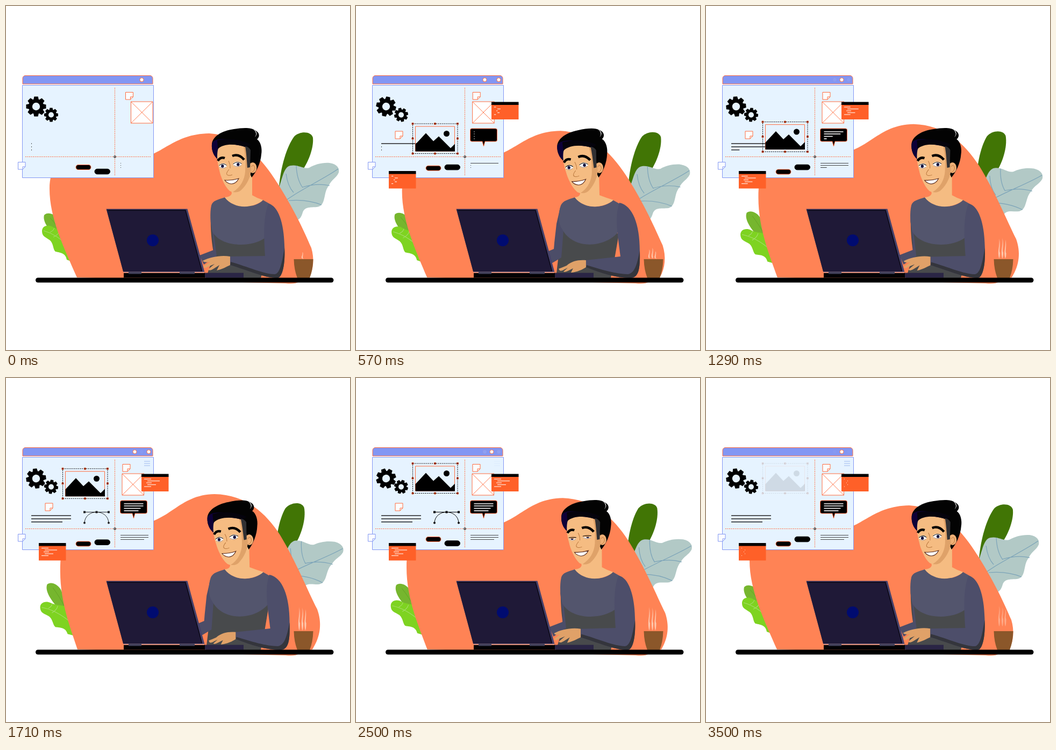
An HTML page with a canvas for the animation above (3570 ms loop, 640 by 640 pixels).

```html
<!DOCTYPE html>
<html lang="en">
<head>
<meta charset="utf-8">
<title>Designer at work</title>
<style>
html, body { margin: 0; width: 100%; height: 100%; overflow: hidden; background: #fff; }
canvas { display: block; }
</style>
</head>
<body>
<canvas id="stage" width="640" height="640"></canvas>
<script>
const ctx = document.getElementById('stage').getContext('2d');
const LOOP = 3570;
const TAU = Math.PI * 2;
const ORANGE = '#ff6b3d', BLUE = '#8296f3', PANEL = '#e6f3ff', INK = '#000';

const ramp = (t, a, b) => Math.min(1, Math.max(0, (t - a) / (b - a)));
const ease = (t, a, b) => {
  const k = ramp(t, a, b);
  return k * k * (3 - 2 * k);
};
const wave = (t, period) => (1 - Math.cos(TAU * t / period)) / 2;

// Blends two path strings that share the same commands.
function morph(a, b, k) {
  const to = b.match(/-?[\d.]+/g);
  let i = 0;
  return a.replace(/-?[\d.]+/g, n => +n + (to[i++] - n) * k);
}

function fill(path, color) {
  ctx.fillStyle = color;
  ctx.fill(new Path2D(path));
}

function stroke(path, color, width = 1) {
  ctx.strokeStyle = color;
  ctx.lineWidth = width;
  ctx.stroke(new Path2D(path));
}

function oval(x, y, rx, ry, color, line) {
  ctx.beginPath();
  ctx.ellipse(x, y, rx, ry, 0, 0, TAU);
  ctx.fillStyle = color;
  ctx.fill();
  if (line) { ctx.strokeStyle = line; ctx.lineWidth = 1; ctx.stroke(); }
}

function box(x, y, w, h, color, line, r = 0) {
  ctx.beginPath();
  ctx.roundRect(x, y, w, h, r);
  if (color) { ctx.fillStyle = color; ctx.fill(); }
  if (line) { ctx.strokeStyle = line; ctx.lineWidth = 1; ctx.stroke(); }
}

function group(draw, { alpha = 1, x = 0, y = 0, scale = 1, turn = 0 } = {}) {
  if (alpha <= 0 || scale <= 0) return;
  ctx.save();
  ctx.globalAlpha *= alpha;
  ctx.translate(x, y);
  ctx.rotate(turn);
  ctx.scale(scale, scale);
  draw();
  ctx.restore();
}

// Turns a drawing around a point of the stage.
function pivot(x, y, degrees, draw) {
  group(() => { ctx.translate(-x, -y); draw(); }, { x, y, turn: degrees * Math.PI / 180 });
}

function dashed(path, color, dash) {
  ctx.setLineDash(dash);
  stroke(path, color);
  ctx.setLineDash([]);
}

function leaves(k) {
  pivot(525, 400, -6 * k, () =>
    fill('M508 336 C511 300 522 262 536 243 C547 232 568 233 571 245 C573 265 561 297 542 318 L510 350Z', '#417505'));
  pivot(478, 397, 5.7 * k, () => {
    fill('M505 345 C514 325 515 300 529 297 C544 294 553 304 564 301 C574 295 588 291 602 292 C616 294 621 302 619 310 C614 321 606 322 600 335 C594 343 594 351 592 358 C590 368 586 373 578 374 C566 375 556 373 552 384 Q548 399 539 398 L500 390Z', '#b2c9c6');
    stroke('M505 374 C535 347 585 326 618 303 M540 297 Q541 323 552 338 M521 312 Q524 335 535 347 M552 337 Q578 329 602 334 M526 362 Q560 359 587 370', '#7ba3b8', 1.2);
  });
  pivot(130, 450, 5 * k, () => {
    fill('M71 389 C76 383 89 385 97 396 C104 408 108 422 120 440 L105 440 C84 422 67 403 71 389Z', '#76b62e');
    stroke('M82 394 Q95 408 110 432', '#5f9a22', .7);
  });
  pivot(157, 458, -5.7 * k, () => {
    fill('M67 419 C67 408 79 406 87 411 C98 418 108 416 125 425 L135 480 L113 472 C111 460 102 459 92 457 C87 453 89 443 82 436 C74 430 67 429 67 419Z', '#7ed321');
    stroke('M70 418 Q95 425 120 450 M82 421 Q89 418 90 413 M88 430 Q98 425 100 418', '#a9dc70', 1);
  });
}

function backdrop(k) {
  fill(morph(
    'M132 505 C108 450 81 395 81 340 C81 300 100 285 130 285 L240 285 C290 280 310 238 378 237 C430 240 470 275 500 322 C535 375 555 420 568 450 C574 470 572 490 564 505 L545 513 Q538 518 520 516 L440 514Z',
    'M133 505 C122 470 101 420 101 360 C101 310 110 285 140 274 L240 273 C305 270 320 217 388 216 C447 217 484 252 510 292 C540 342 561 395 579 430 C588 455 586 480 570 505 L545 513 Q538 518 520 516 L440 514Z',
    k), '#ff8355');
}

function gear(x, y, size, turn) {
  group(() => {
    ctx.fillStyle = INK;
    for (let i = 0; i < 8; i++) {
      ctx.rotate(TAU / 8);
      ctx.beginPath();
      ctx.moveTo(-5, -12);
      ctx.lineTo(-3.6, -18.5);
      ctx.lineTo(3.6, -18.5);
      ctx.lineTo(5, -12);
      ctx.fill();
    }
    oval(0, 0, 14, 14, INK);
    oval(0, 0, 7.2, 7.2, PANEL);
  }, { x, y, scale: size, turn });
}

function note(x, y, w, h, line) {
  const r = x + w, b = y + h;
  const path = `M${x} ${y} H${r} V${b - 5} L${r - 5} ${b} H${x}Z`;
  fill(path, '#fbfdff');
  stroke(path + ` M${r} ${b - 5} H${r - 5} V${b}`, line);
}

// Each row is x, y, length.
function rows(list, color, width, part) {
  list.forEach(([x, y, len], i) => stroke(`M${x} ${y} h${Math.max(1, len * part(i))}`, color, width));
}

function card(x, y, t) {
  const len = ramp(t, 290, 1400) * (1 - ramp(t, 2700, 3450));
  group(() => {
    box(0, -28, 50.5, 28, '#ff6028');
    box(0, -32.5, 50.5, 5.5, INK);
    rows([[5, -23, 13], [11, -19.5, 23], [9, -16, 10], [11, -12.5, 16], [5, -9, 13]], '#ffe9df', 1.2, () => len);
  }, { x, y, scale: ease(t, 0, 360) });
}

function picture(t) {
  group(() => {
    dashed('M.5 .5 H84 V56 H.5Z', INK, [2, 1.6]);
    box(5.5, 5.5, 73, 46, null, ORANGE);
    fill('M5.5 52 V39 L25 18 L39 33 L49 24 L71 46 L79 38 V52Z', INK);
    oval(63.5, 19, 5.5, 5.5, INK);
    for (const x of [.5, 42, 84])
      for (const y of [.5, 28, 56])
        if (x !== 42 || y !== 28) box(x - 1.5, y - 1.5, 3, 3, '#5a1500', '#d04a20');
  }, { x: 105, y: 218.5 - 60 * ease(t, 1190, 1890), alpha: ramp(t, 120, 430) * (1 - ramp(t, 3150, 3540)) });
}

function curveTool(t) {
  group(() => {
    stroke('M146 249.5 H191 M146 269 C148 243 189 243 191 269', INK);
    for (const x of [146, 168.5, 191]) box(x - 2, 247.5, 4, 4, INK);
    oval(146, 269.5, 2, 2, INK);
    oval(191, 269.5, 2, 2, INK);
  }, { alpha: ramp(t, 1300, 1800) * (1 - ramp(t, 2980, 3450)) });
}

function bubble(t) {
  const s = ease(t, 0, 550);
  group(() => {
    const path = 'M-22 -34 H22 Q25 -34 25 -31 V-13 Q25 -10 22 -10 H2.5 L0 -1 L-2.5 -10 H-22 Q-25 -10 -25 -13 V-31 Q-25 -34 -22 -34Z';
    fill(path, INK);
    stroke(path, ORANGE);
    if (t > 550)
      rows([[-18, -28, 36], [-18, -24, 36], [-18, -19.5, 31], [-18, -15, 27]], '#fff', 1.6,
        i => ramp(t, 720 + 160 * i, 1200 + 160 * i));
  }, { x: 237.5, y: 262, scale: s, alpha: s ** 3 });
}

function pills(t) {
  const c = t % 2380;
  const left = 300 + 8.5 * (ease(c, 400, 1000) - ease(c, 1850, 2350));
  const right = 308 - 8 * (ease(c, 50, 600) - ease(c, 1400, 1880));
  box(130, left - 4.5, 28, 9, INK, ORANGE, 4.5);
  box(165, right - 4.8, 28.5, 9.6, INK, INK, 4.8);
}

function board(t) {
  const beat = wave(t, 1190);
  box(31, 129.5, 242, 15.5, BLUE, ORANGE, [5, 5, 0, 0]);
  [239, 252, 265].forEach((x, i) =>
    group(() => oval(x + .5, 137.3, 3.6, 3.6, '#fff', ORANGE), { alpha: i === 1 ? 1 - beat : beat }));
  box(30.5, 147.5, 244, 172, PANEL, BLUE);

  dashed('M202.5 152 V315 M36 280.5 H270', ORANGE, [2, 1.5]);
  box(201, 279, 3, 3, '#fff', INK);

  const spin = TAU * t / LOOP;
  gear(56, 187, 1, spin);
  gear(84, 202.5, .7, -spin);

  const menu = ramp(t, 1400, 1650) * (1 - .85 * ramp(t, 2250, 2500)) - .1 * ramp(t, 2500, 2900) + .95 * ramp(t, 3120, 3420);
  group(() => stroke('M257 155 h11 M257 159 h11 M257 163 h11', '#9fb9ee'), { alpha: Math.min(1, menu) });

  const part = i => ramp(t, 570 * i, 570 * (i + 1));
  rows([[47, 256, 74], [47, 262, 74], [47, 267.7, 58]], '#222', 1.4, part);
  rows([[213, 292.5, 52], [213, 296.5, 52], [213, 300.5, 44]], '#444', 1.1, part);

  const slide = ease(t, 0, 650);
  note(222.5 - 5.5 * slide, 160.5, 14, 13.5, ORANGE);
  const x = 232.5 - 16.5 * slide;
  box(x, 178, 40.5, 40, '#fff', ORANGE);
  stroke(`M${x} 178 l40.5 40 M${x + 40.5} 178 l-40.5 40`, ORANGE, .9);

  const pop = ease(t, 0, 560) * (1 - ease(t, 2960, 3450));
  group(() => note(-14, -14, 14, 14, ORANGE), { x: 87, y: 247, scale: pop, alpha: Math.min(1, 1.2 * pop) });

  picture(t);
  curveTool(t);
  bubble(t);
  pills(t);
  note(22.5, 290.5, 13.5, 13.5, BLUE);
  card(252, 211, t);
  card(61, 339.5, t);
}

function cup(t) {
  const lift = ramp(t, 2500, 3570);
  [[545.5, 180], [551.5, -500], [557, 400]].forEach(([x, start], i) => {
    if (t < start) return;
    const h = 12 + 32 * ease(t, Math.max(start, 0), 1750);
    const b = 470 - 8 * lift, m = b - h / 2, top = Math.max(b - h, 424 + 3 * i);
    group(() => fill(`M${x} ${b} C${x - 4} ${m + 4} ${x + 1} ${m} ${x} ${top} C${x + 3} ${m - 5} ${x - 1} ${m + 4} ${x + 1.5} ${m + 8} Q${x + 1.5} ${b - 4} ${x} ${b}Z`, '#ffd0b8'),
      { alpha: .9 - .4 * lift });
  });
  fill('M535.5 471 H571.5 Q571 491 565 506 H542 Q536 491 535.5 471Z', '#8b572a');
}

function eye(x, y, rx, px, shut) {
  ctx.save();
  ctx.beginPath();
  ctx.ellipse(x, y, rx, 4.9, -.05, 0, TAU);
  ctx.clip();
  box(x - 10, y - 6, 20, 12, '#fff');
  oval(px, y + .3, 2.7, 2.9, '#0a0a3c');
  box(x - 10, y - 6, 20, 1 + 6 * shut, '#f0b277');
  ctx.restore();
  const lid = y - 4.7 + 5.5 * shut;
  stroke(`M${x - rx} ${y - .5} Q${x} ${lid - 2.5} ${x + rx} ${y - 1}`, INK, 1);
  stroke(`M${x - rx + 1} ${y + 2} Q${x} ${y + 6.8} ${x + rx - 1} ${y + 2}`, '#7a4a28', .7);
}

function head(k, t) {
  const shut = 1 - ramp(Math.abs(t % (LOOP / 2) - 800), 90, 200);
  pivot(455, 426, -3 * k, () => {
    fill('M383 257 C384 243 401 232 424 229 C442 226 456 226 463 231 C472 235 473 243 467 248 C474 252 477 266 475 276 C474 292 465 310 457 319 L444 290 L395 286 C386 279 382 268 383 257Z', '#030303');
    fill('M460 229 Q471 236 463 244 Q469 237 460 229Z', '#fff');
    fill('M383 257 C384 249 396 246 412 248 L450 262 L395 286 C386 279 382 268 383 257Z', '#0d0038');
    oval(459, 301, 7.5, 10, '#f0b076');
    stroke('M456 299 Q462 293 463 302 Q461 309 457 309', '#b9783f', .9);
    fill('M394 268 C397 257 408 256 425 258 C440 260 448 262 449 267 L455 303 C456 316 449 332 437 343 C429 348 421 347 416 344 C406 335 399 316 397 306 C393 292 392 278 394 268Z', '#f5bc82');
    fill('M442 262 L450 264 L456 303 C456 316 449 332 437 343 C432 347 427 347 422 346 C436 338 444 323 445 308 C446 290 445 275 442 262Z', '#dfa269');
    fill('M393 250 C410 246 435 247 456 258 L447 263 C430 256 405 255 394 266Z', '#05030c');
    fill('M445 261 Q452 262 455 268 L454 300 L449 301 C448 286 447 272 445 261Z', '#303033');
    stroke('M394 288 Q399 280 407 283', INK, 4.5);
    stroke('M421 279 Q433 274 443 286', INK, 4.5);
    eye(403.5, 297.5, 7, 402.8, shut);
    eye(430.5, 294.5, 8, 431.8, shut);
    stroke('M414 288 Q418 296 417 302 M415 304 Q407 313 413 315 Q417 316 421 314', '#b9783f', 1);
    const smile = 'M407 324 Q420 325 433 321 Q428 331 419 331 Q411 330 407 324Z';
    fill(smile, '#fff');
    stroke(smile, '#5a2a1a', 1.1);
  });
}

function man(k, t) {
  const part = (a, b, color) => fill(morph(a, b, k), color);
  part('M400 365 L382 380 C379 400 382 440 387 462 L372 506 H474 L486 470 L490 375Z',
       'M400 365 L384 380 C380 400 378 440 377 462 L372 506 H474 L481 470 L489 425Z', '#484a4c');
  part('M382 380 L381 400 L386 440 L386 454 L360 464 L368 481 L392 465 L386 420Z',
       'M380 375 L373 405 L369 440 L368 452 L356 457 L362 480 L382 468 L386 418Z', '#4c4d68');
  part('M407 356 C395 360 384 362 382 371 C379 385 380 405 384 420 C400 449 455 450 481 432 L494 370 L478 361 C465 376 425 380 407 356Z',
       'M407 356 C395 360 385 362 381 371 C376 385 376 405 383 414 C403 455 465 450 488 420 L494 370 L478 361 C465 376 425 380 407 356Z', '#53556d');
  part('M419 340 L458 310 L458 352 Q468 358 478 361 C462 376 425 380 407 356 Q418 355 420 349Z',
       'M415 340 L452 310 L453 352 Q466 357 479 361 C462 376 425 380 407 356 Q416 355 417 349Z', '#f5bc82');
  head(k, t);
  part('M417 466 C400 463 380 467 366 474 Q368 478 380 476 L368 484 Q367 490 376 485 L388 480 L376 490 Q378 494 386 489 L397 482 L392 492 C402 490 410 485 417 482Z',
       'M428 473 C414 472 402 474 392 483 Q385 486 377 489 L379 492 Q382 494 388 490 L394 487 L386 494 Q388 496 394 493 L404 488 L400 496 C412 495 422 490 428 486Z', '#e0a168');
  part('M488 368 C507 371 517 405 518 445 C520 480 514 506 505 506 C480 506 445 490 417 482 L417 466 L482 465 C480 430 478 395 488 368Z',
       'M490 366 C515 371 528 407 528 455 C529 490 526 506 510 506 C485 506 455 497 428 486 L428 473 L492 466 C488 430 480 395 490 366Z', '#4d4e6a');
  part('M518 450 C520 480 514 506 505 506 C480 506 445 490 417 482 L418 476 C450 485 480 499 500 499 C510 498 514 475 518 450Z',
       'M528 455 C529 490 526 506 510 506 C485 506 455 497 428 486 L429 482 C455 490 485 499 506 499 C519 497 523 480 528 455Z', '#34353c');
}

function laptop() {
  box(369, 496.5, 73, 9, '#2a2545');
  box(219, 496.5, 151, 9, '#020204');
  fill('M186.5 377.5 H337.5 L369.5 495 H218.5Z', '#45416a');
  fill('M187 378.5 H334.5 L365.5 494 H218Z', '#1f1937');
  stroke('M190 380.5 H334 L364.5 493.5', '#07060f', 1.2);
  stroke('M219 495.6 H369', '#f2a08b', 1.6);
  box(228, 494.5, 24, 4, '#41405a');
  box(323, 494.5, 28, 4, '#41405a');
  oval(273, 436, 11, 11, '#000b70');
}

function desk() {
  ctx.lineCap = 'round';
  stroke('M59.5 510 H605', INK, 9);
  ctx.lineCap = 'butt';
}

function frame(now) {
  const t = now % LOOP;
  const sway = wave(t, LOOP);
  ctx.fillStyle = '#fff';
  ctx.fillRect(0, 0, 640, 640);
  leaves(sway);
  backdrop(sway);
  board(t);
  cup(t);
  man(wave(t, 1190), t);
  laptop();
  desk();
  requestAnimationFrame(() => frame(performance.now() - start));
}

const start = performance.now();
frame(0);
</script>
</body>
</html>
```
